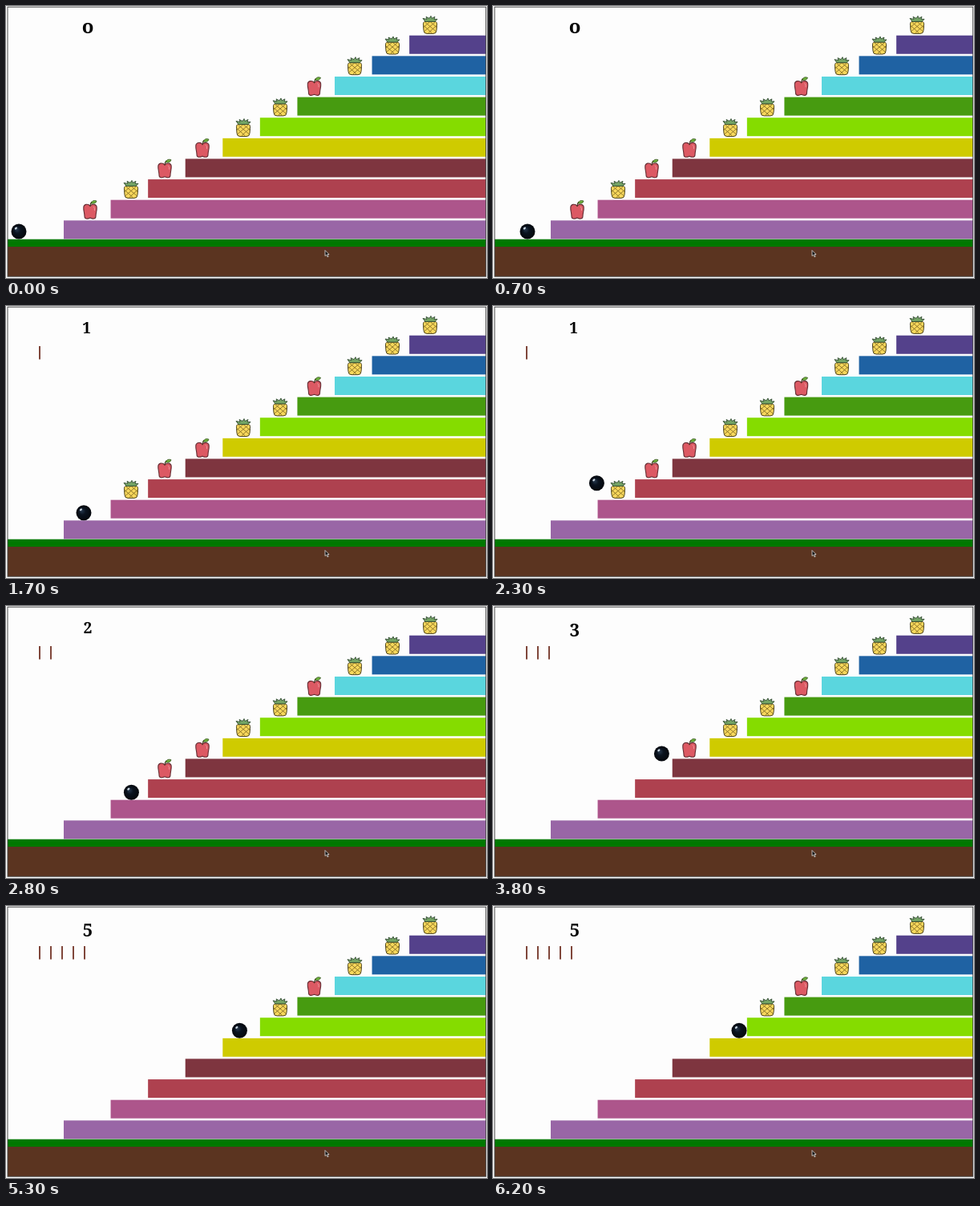
An HTML page with a canvas for the animation above (6.3 s loop, 600 by 339 pixels).

```html
<!DOCTYPE html>
<html lang="en">
<head>
<meta charset="utf-8">
<title>Ball on the stairs</title>
<style>
  html, body { margin: 0; width: 100%; height: 100%; overflow: hidden; background: #fff; }
  canvas { display: block; }
</style>
</head>
<body>
<canvas id="stage" width="600" height="339"></canvas>
<script>
const ctx = document.getElementById('stage').getContext('2d');
const LOOP = 6300, TICK = 100;
const RISE = 25.62, FLOOR_Y = 281, LAST_X = 307;
const SPEED = 54, START = 0.2;            // px per second, seconds
const JUMPS = [0.9, 2, 2.85, 3.7, 4.6];   // take-off times in seconds
const LIFT = 278, FALL = 516;             // height = LIFT * t - FALL * t^2
const STEP_COLORS = ['#9966a6', '#ad558b', '#ae414f', '#7e353f', '#cfcb00',
                     '#85dc00', '#479b10', '#5ad6de', '#1f62a3', '#54418b'];
const FRUIT_X = [105, 156, 198, 245, 296, 342, 384.5, 435, 482, 529];
const FRUITS = 'APAAPPAPPP';
// glyph, size, baseline: small digits for 0-2, descending ones above
const DIGITS = [['o', 24, 34], ['1', 19, 34], ['2', 19, 34],
                ['3', 22, 38], ['4', 22, 38], ['5', 22, 38]];

function rect(x, y, w, h, color) {
  ctx.fillStyle = color;
  ctx.fillRect(x, y, w, h);
}

function shape(d, fill, stroke, width = 1) {
  const path = new Path2D(d);
  if (fill) { ctx.fillStyle = fill; ctx.fill(path); }
  if (stroke) { ctx.strokeStyle = stroke; ctx.lineWidth = width; ctx.stroke(path); }
}

function at(x, y, draw) {
  ctx.save();
  ctx.translate(x, y);
  draw();
  ctx.restore();
}

function apple() {
  shape('M0-5C-3-8-8-7-8.2-3C-8.5 1-7 4-7 8C-7 12-3 11.5 0 10C3 11.5 7 12 7 8C7 4 8.5 1 8.2-3C8-7 3-8 0-5Z',
        '#dc5963', '#652d33', 1.1);
  shape('M4-4Q6-3 5.5 1', null, '#ed949a');
  shape('M0-4Q0-8 2-10', null, '#49331f', 1.2);
  shape('M1-8Q3-13 8-11Q7-7 1-8Z', '#6fb23c', '#35551f', 0.8);
}

function pineapple() {
  shape('M-6-4Q-9-4-8.5 1L-8 7Q-8 11-4 11L4 11Q8 11 8 7L8.5 1Q9-4 6-4Z',
        '#f8d85c', '#4b431d');
  shape('M-8 1L2 10M-6-3L7 8M0-4L8 3M8 1L-2 10M6-3L-7 8M0-4L-8 3', null, '#7c6520', 0.8);
  shape('M-6-4L-9-8L-4-7L-5-10L-1-8L1-11L2-8L6-10L5-7L9-7L6-4Z',
        '#74a565', '#314b32', 0.9);
}

function ball() {
  const shade = ctx.createRadialGradient(-3, -3, 0.5, 0, 0, 9.5);
  shade.addColorStop(0, '#26384d');
  shade.addColorStop(0.4, '#0a131f');
  shade.addColorStop(1, '#04070c');
  ctx.fillStyle = shade;
  ctx.beginPath();
  ctx.arc(0, 0, 9.5, 0, 7);
  ctx.fill();
  ctx.fillStyle = '#c9d5df';
  ctx.beginPath();
  ctx.ellipse(-3.6, -4, 1.8, 1.2, -0.7, 0, 7);
  ctx.fill();
}

function ballX(t) {
  return Math.min(LAST_X, 16 + SPEED * Math.max(0, t - START));
}

function ballY(t) {
  const hop = JUMPS.filter(j => j <= t).length - 1;
  if (hop < 0) return FLOOR_Y;
  // the first rise is a little lower than the others
  const level = n => n ? 257.8 - (n - 1) * RISE : FLOOR_Y;
  const age = t - JUMPS[hop];
  const y = level(hop) - LIFT * age + FALL * age * age;
  return age > LIFT / FALL / 2 ? Math.min(y, level(hop + 1)) : y;
}

function drawScene(t) {
  const x = ballX(t);
  const score = FRUIT_X.filter(f => x > f - 9.5).length;

  rect(0, 0, 600, 339, '#fff');
  rect(2, 1, 597, 336, '#fdfdfd');
  STEP_COLORS.forEach((color, i) => {
    const left = i ? 84 + i * 46.57 : 72;
    rect(left, 267.3 - i * RISE, 599 - left, 23, color);
  });
  rect(2, 290.7, 597, 9.3, '#007800');
  rect(2, 300, 597, 37, '#5b3420');
  ctx.strokeStyle = '#444';
  ctx.lineWidth = 1;
  ctx.strokeRect(2, 1.2, 596.7, 336);

  FRUIT_X.forEach((fx, i) => {
    if (i >= score) at(fx, 254 - i * RISE, FRUITS[i] === 'A' ? apple : pineapple);
  });

  const [glyph, size, base] = DIGITS[score];
  ctx.fillStyle = '#000';
  ctx.textAlign = 'center';
  ctx.font = `${score > 3 ? 600 : 700} ${size}px "Noto Serif", serif`;
  ctx.fillText(glyph, score === 1 ? 100.5 : 102, base);
  for (let i = 0; i < score; i++) rect(41 + i * 14, 50, 2, 16.5, '#80473b');

  at(x, ballY(t), ball);
  at(398, 304.5, () =>
    shape('M0 0L0 7L1.7 5.5L3 8.3L4.2 7.7L3 5L5 5Z', '#111', '#ddd', 0.8));
}

function frame(now) {
  drawScene(Math.floor(now % LOOP / TICK) * TICK / 1000);
  requestAnimationFrame(frame);
}
requestAnimationFrame(frame);
</script>
</body>
</html>
```
